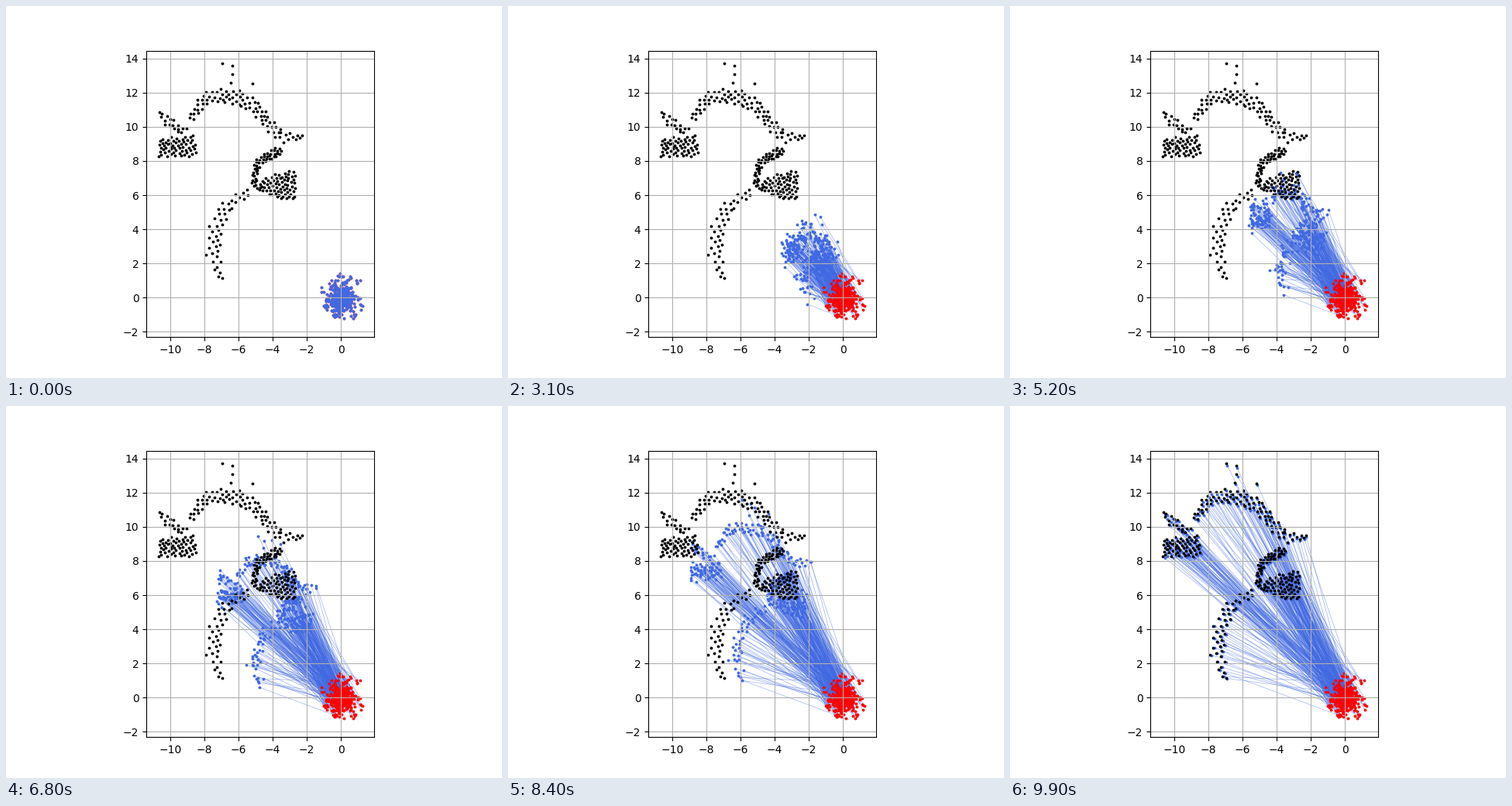
Animation, 640 px wide and 480 px high, one loop 10000 ms. Source, as a matplotlib script:

```python
import numpy as np
import matplotlib.pyplot as plt
from matplotlib.animation import FuncAnimation
from matplotlib.collections import LineCollection

FRAMES = 100
BLUE = "royalblue"
GOLDEN = (5 ** 0.5 - 1) / 2
rng = np.random.default_rng(7)


def stroke(n, *knots):
    """Spread n dots evenly over a band through (x, y, half width) knots."""
    x, y, w = np.array(knots).T
    step = np.hypot(np.diff(x), np.diff(y))
    length = np.r_[0, np.cumsum(step)]
    area = np.r_[0, np.cumsum(step * (w[1:] + w[:-1]) / 2)]

    i = np.arange(n)
    s = np.interp((i + 0.5) / n * area[-1], area, length)

    def at(t):
        return np.array([np.interp(t, length, x), np.interp(t, length, y)])

    dx, dy = at(s + 0.2) - at(s - 0.2)
    normal = np.array([-dy, dx]) / np.hypot(dx, dy)
    side = 2 * (i * GOLDEN % 1) - 1
    dots = at(s) + normal * side * np.interp(s, length, w)
    return dots.T + rng.normal(0, 0.03, (n, 2))


tail = stroke(43, (-7.05, 1, 0.1), (-7.45, 2.5, 0.45), (-7.3, 4.1, 0.4),
              (-6.7, 5.5, 0.4), (-5.3, 6.2, 0.25))
neck = stroke(47, (-5.1, 6.4, 0.17), (-5.0, 7.7, 0.17),
              (-4.5, 8.2, 0.25), (-3.5, 8.65, 0.25))
back = stroke(84, (-2.2, 9.4, 0.1), (-3.6, 9.4, 0.4), (-4.4, 10.5, 0.3),
              (-5.6, 11.6, 0.5), (-7, 11.9, 0.4), (-8.1, 11.6, 0.35),
              (-8.8, 10.4, 0.25))
spikes = [(-6.95, 13.72), (-6.36, 13.58), (-6.36, 13.08), (-6.45, 12.6),
          (-5.18, 12.55)]
horn = stroke(17, (-10.6, 11, 0.1), (-10.3, 10.4, 0.3), (-9.1, 9.7, 0.3))
hand = stroke(58, (-10.7, 8.8, 0.5), (-8.5, 8.9, 0.65))
wing = stroke(68, (-4.8, 6.6, 0.25), (-3.9, 6.55, 0.7), (-2.65, 6.55, 0.95))

shape = np.vstack([tail, neck, back, spikes, horn, hand, wing])
start = rng.normal(0, 0.5, shape.shape)
start = np.clip(start, (-1.33, -1.55), (1.33, 1.73))
end = rng.permutation(shape)

fig, ax = plt.subplots(figsize=(6.4, 4.8), dpi=100)
ax.set_aspect("equal")
ax.set_xlim(-11.39, 1.94)
ax.set_ylim(-2.31, 14.46)
ax.set_xticks(range(-10, 1, 2))
ax.set_yticks(range(-2, 15, 2))
ax.grid(True)

rays = ax.add_collection(
    LineCollection([], colors=BLUE, linewidths=0.5, alpha=0.5, zorder=0.9),
    autolim=False)
ax.scatter(*start.T, s=3, color="red")
movers = ax.scatter(*start.T, s=3, color=BLUE)
ax.scatter(*shape.T, s=3, color="black")


def update(i):
    now = start + (end - start) * i / FRAMES
    movers.set_offsets(now)
    rays.set_segments(np.stack([start, now], axis=1))
    return rays, movers


anim = FuncAnimation(fig, update, frames=FRAMES, interval=100,
                     repeat=True, repeat_delay=0)
plt.show()
```
